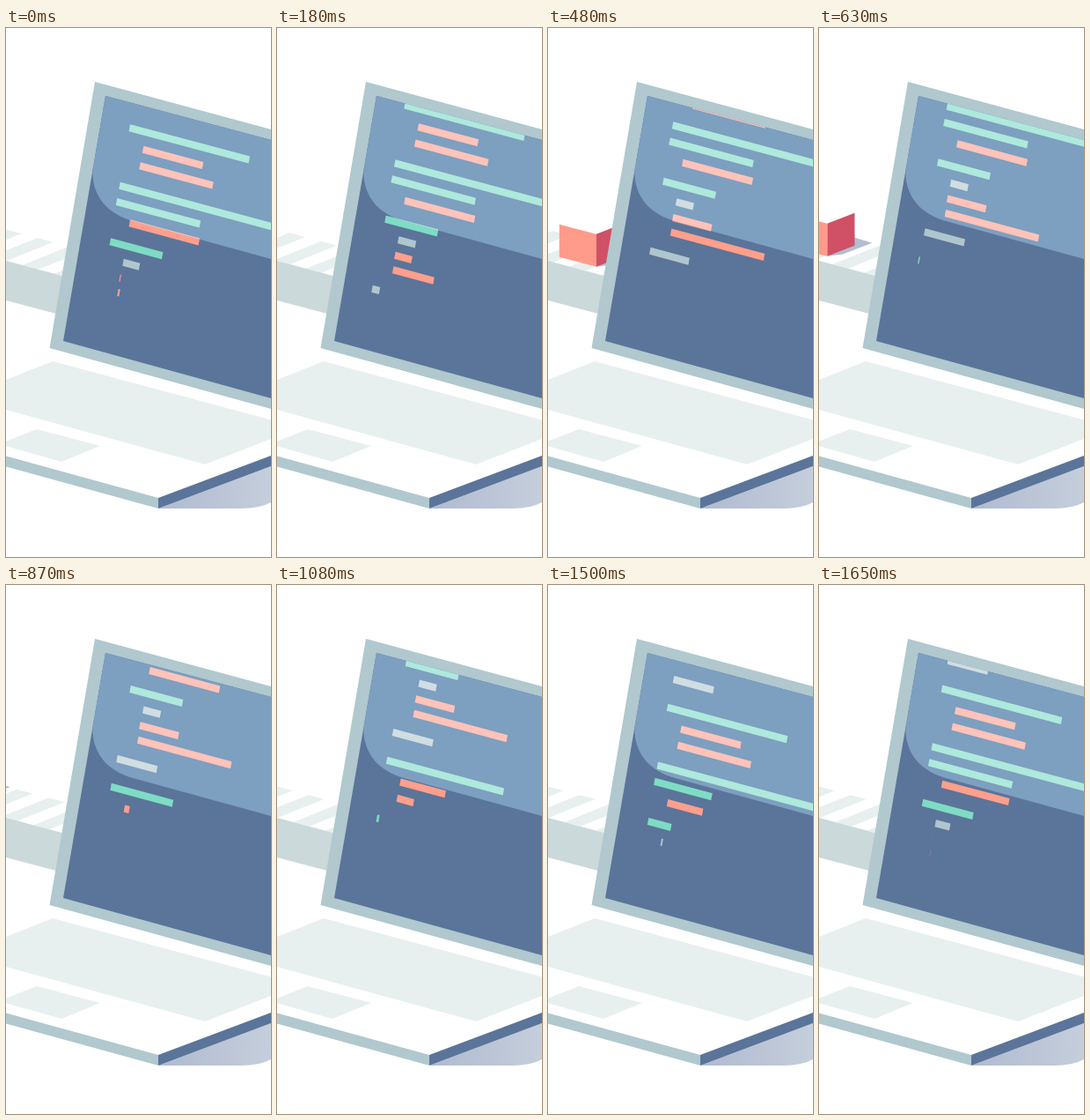
An HTML page with a canvas that plays this animation: 301 by 600 pixels, repeating every 1.68 s.

```html
<!DOCTYPE html>
<html lang="en">
<head>
<meta charset="utf-8">
<title>Laptop and conveyor</title>
<style>
  html, body { margin: 0; width: 100%; height: 100%; overflow: hidden; background: #fff; }
  canvas { display: block; }
</style>
</head>
<body>
<canvas id="stage" width="301" height="600"></canvas>
<script>
const ctx = document.getElementById('stage').getContext('2d');
const LOOP = 1680;
const TILT = 0.268;        // slope of the code lines
const LEAN = 0.183;        // sideways drift per pixel scrolled
const SCROLL = 240 / LOOP; // pixels per ms
const BELT_SLOPE = 0.264;
const BELT_TIME = 1000, BELT_TRAVEL = 216, STRIPE = 36;

// Each ink has a shade for the dark screen and one under the glare.
const GREEN = ['#7edcc4', '#aee9dc'];
const CORAL = ['#ff9f8c', '#ffc3b9'];
const GREY = ['#b0c6cd', '#d0dde1'];

// x and y at the end of the first loop, full width, typing start and duration in ms
const codeLines = [
  [141, 109.3, 136, 600, 530, GREEN],
  [156.3, 134, 68, 797, 420, CORAL],
  [152.7, 152.3, 83, 945, 441, CORAL],
  [129.7, 175, 190, 1047, 496, GREEN],
  [126.2, 193.2, 95, 1225, 440, GREEN],
  [141, 217.5, 79.5, 1300, 400, CORAL],
  [119, 238.5, 59.5, 1340, 350, GREEN],
  [133.7, 262, 19.7, 1450, 270, GREY],
  [129.9, 279.7, 44, 1637, 490, CORAL],
  [127.7, 296.2, 106, 1641, 480, CORAL],
  [104, 317.5, 45.5, 1728, 480, GREY]
];

const screen = new Path2D('M113 77L301 127V420L65 355Z');
const glare = new Path2D('M113 77L301 127V262L146 219.5C114 211 98 190 98.3 162Z');

const clamp = p => Math.min(1, Math.max(0, p));
const smooth = p => p * p * (3 - 2 * p);

function poly(color, ...points) {
  ctx.fillStyle = color;
  ctx.beginPath();
  for (let i = 0; i < points.length; i += 2) ctx.lineTo(points[i], points[i + 1]);
  ctx.fill();
}

function clipped(path, draw) {
  ctx.save();
  ctx.clip(path);
  draw();
  ctx.restore();
}

function drawConveyor(time) {
  const p = clamp(time / BELT_TIME);
  const travel = BELT_TRAVEL * (0.15 * p + 0.85 * smooth(p));

  clipped(new Path2D('M0 228.3L110 258V293.5L0 264Z'), () => {
    for (let i = 0; i < 7; i++) {
      const x = 18 + STRIPE * i - travel % STRIPE;
      const y = 228.3 + 0.268 * x;
      poly('#e7f0ef', x - 18, y - 4.8, x, y, x - 80, y + 32, x - 98, y + 27.2);
    }
  });
  poly('#cbd9da', 0, 264, 110, 293.5, 110, 338, 0, 309);

  ctx.save();
  const shift = 147 - travel;
  ctx.translate(shift, shift * BELT_SLOPE);
  poly('#b2bed2', 10, 259, 27, 257, 61, 244, 41, 238);
  poly('#ff9b8a', -32, 211, 10, 222, 10, 259, -32, 248);
  poly('#d05066', 10, 222, 41, 210, 41, 247, 10, 259);
  ctx.restore();
}

function drawCode(time, shade) {
  for (const [x0, y0, width, start, duration, ink] of codeLines) {
    for (let now = time; now < 3 * LOOP; now += LOOP) {
      const w = width * smooth(clamp((now - start) / duration));
      if (!w) continue;
      const up = (now - LOOP) * SCROLL;
      const x = x0 + up * LEAN, y = y0 - up;
      poly(ink[shade], x, y, x + w, y + w * TILT,
        x + w - 1.5, y + w * TILT + 8, x - 1.5, y + 8);
    }
  }
}

function drawLaptop(time) {
  const shadow = ctx.createLinearGradient(173, 0, 301, 0);
  shadow.addColorStop(0, '#afbad0');
  shadow.addColorStop(1, '#c5cedb');
  ctx.fillStyle = shadow;
  ctx.fill(new Path2D('M173 545L301 497V538Q288 545 268 545Z'));

  poly('#b0c8ce', 0, 485.5, 173, 533, 173, 545, 0, 497.5);
  poly('#5b7499', 173, 533, 301, 485, 301, 497, 173, 545);
  poly('#e7f0ef', 0, 399, 53, 378, 301, 444.5, 301, 466, 226, 495, 0, 433);
  poly('#e7f0ef', -8, 472, 35, 455, 107, 474, 63, 492);

  poly('#b0c8ce', 101, 61, 301, 115, 301, 432, 49.5, 363);
  ctx.fillStyle = '#5b7499';
  ctx.fill(screen);
  clipped(screen, () => drawCode(time, 0));
  ctx.fillStyle = '#7d9fc0';
  ctx.fill(glare);
  clipped(glare, () => drawCode(time, 1));
}

const begin = performance.now();
function frame() {
  const time = (performance.now() - begin) % LOOP;
  ctx.fillStyle = '#fff';
  ctx.fillRect(0, 0, 301, 600);
  drawConveyor(time);
  drawLaptop(time);
  requestAnimationFrame(frame);
}
frame();
</script>
</body>
</html>
```
